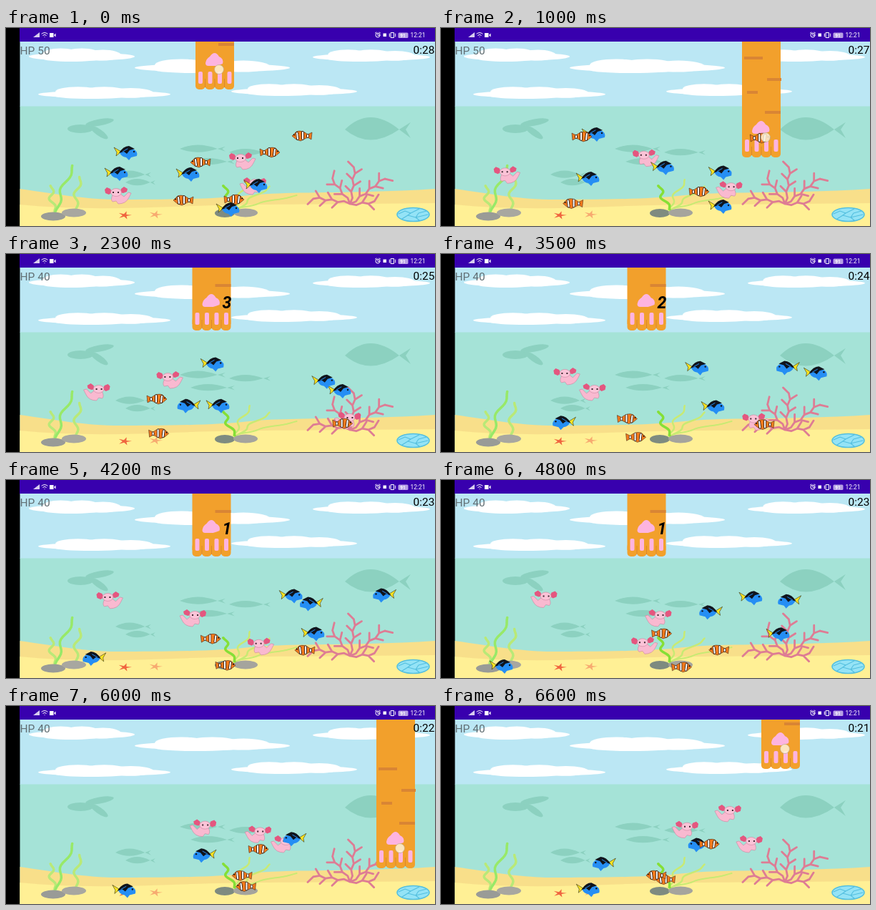
These frames come from a looping animation (600x277 px, 6.7 s). An HTML page:

```html
<!DOCTYPE html>
<html lang="en">
<head>
<meta charset="utf-8">
<title>Fishing paw</title>
<style>
html, body { margin: 0; width: 100%; height: 100%; overflow: hidden; background: #000; }
svg { display: block; width: 100vw; height: 100vh; }
text { font-family: Roboto, Arial, sans-serif; }
.line { fill: none; stroke-linecap: round; stroke-linejoin: round; }
</style>
</head>
<body>
<svg viewBox="0 0 600 277" preserveAspectRatio="none">
  <defs>
    <clipPath id="water"><rect x="19.500" y="19" width="581" height="258"/></clipPath>

    <!-- All three sprites face right -->
    <g id="tang">
      <path fill="#ffe51f" stroke="#2a2a18" stroke-width=".600" d="M-17-7L-7-1L-14 5L-13 0Z"/>
      <path fill="#258ef4" d="M-9 0Q0-9 9-5Q17-2 15 5L7 7L4 11L0 7Q-7 6-9 0Z"/>
      <path fill="#10141c" d="M-10 1Q-4-9 4-9L12-5L5-3L1 2L-3-1Z"/>
      <path class="line" stroke="#258ef4" d="M-5-1L2-5"/>
      <circle cx="11" cy="-1" r="1.200" fill="#10141c"/>
    </g>
    <g id="clown">
      <path fill="#f47a1c" stroke="#4a2a18" stroke-width=".600" d="M-14-5L-8-2Q0-9 8-6L14 0L8 5L2 7L-8 2L-13 5Z"/>
      <path id="bands" class="line" stroke="#33241c" stroke-width="3.400" d="M7-4L6 4M-1-5V4M-8-1V1"/>
      <use href="#bands" style="stroke:#fff"/>
      <path class="line" stroke="#fff" stroke-width="2" d="M7-4L6 4M-1-5V4M-8-1V1"/>
      <circle cx="11" cy="-1.500" r="1.100" fill="#22150f"/>
    </g>
    <g id="axolotl" stroke="#cc839e" stroke-width=".600">
      <path fill="#f9b9d0" d="M8-1Q11 5 8 8L3 7L0 11Q-11 11-15 2L-18-4L-14-5L-8 1L-3-3Z"/>
      <path fill="#e4567f" stroke="none" d="M-3-5L-7-4L-12-6L-13-10L-8-13L-4-10ZM9-5L11-10L16-12L19-9L18-4L13-2Z"/>
      <ellipse cx="3" cy="-5" rx="7.500" ry="5.500" fill="#fbc3d7"/>
      <path fill="#3d2530" stroke="none" d="M-1-6h2v2h-2zM6-6h2v2h-2z"/>
    </g>

    <!-- Origin at the bottom centre -->
    <g id="paw">
      <path fill="#f2a02c" d="M-27-300H27V-8H-27Z"/>
      <path fill="#d98534" d="M-24-140h26v4h-26zM8-110h20v4h-20zM-20-92h15v4h-15zM5-64h22v4h-22z"/>
      <path fill="#fdb4e0" d="M-13-36Q-12-42-7-45Q0-55 6-45Q13-42 11-35Q6-33 2-32H-9Q-13-32-13-36Z"/>
      <g id="toes"></g>
    </g>
  </defs>

  <rect width="600" height="277"/>
  <rect x="19" width="581" height="19.500" fill="#3800ae"/>

  <g fill="#fff">
    <path d="M38 13L47 6V13Z" opacity=".8"/>
    <path d="M61 7h5.500v6h-5.500zM67 10L69.500 7.500V12.500Z"/>
    <g class="line" stroke="#fff">
      <path d="M50 8Q54 5 58 8M51.700 10.300Q54 8 56.300 10.300M54 12.500V12.600"/>
      <circle cx="520" cy="10" r="3"/>
      <path d="M520 8.300V10.300H521.500M516.500 7L518 6M523.500 7L522 6M538.500 6.500h4v7h-4zM536.300 8v4M544.700 8v4"/>
    </g>
    <rect x="527.500" y="7.500" width="4.500" height="4.500"/>
    <rect x="548.500" y="6.500" width="14" height="7.500" rx="1.500" fill="#b7a0e5"/>
    <text x="555" y="12.700" font-size="6.500" font-weight="700" text-anchor="middle">91</text>
    <text x="565.500" y="13" font-size="8.400">12:21</text>
  </g>

  <g clip-path="url(#water)">
    <rect x="19" y="19" width="581" height="91" fill="#bbe7f4"/>
    <rect x="19" y="109.500" width="581" height="168" fill="#a5e3d7"/>
    <g id="clouds" fill="#fff"></g>
    <g id="shadows" fill="#8cd1c0"></g>
    <path fill="#f8df8a" d="M19 225C70 232 110 240 160 240S290 240 340 234S500 232 600 225V277H19Z"/>
    <path fill="#fff095" d="M19 247C100 255 180 252 260 249S450 247 600 245V277H19Z"/>
    <g id="weeds" class="line"></g>
    <g id="rocks"></g>
    <path id="coral" class="line" stroke="#de7c94" stroke-width="2.800"/>
    <ellipse cx="569.500" cy="261" rx="22.500" ry="9.500" fill="#94e3f6" stroke="#54bfdf" stroke-width="1.600"/>
    <path class="line" stroke="#54bfdf" stroke-width="1.200" d="M549 260L558 256L566 259L578 253M554 267L562 262L573 265L590 261M566 259L562 262M573 265L577 259L588 256M573 265L578 269"/>

    <use id="arm" href="#paw"/>
    <g id="shoal"></g>
    <circle id="finger" r="6.500" fill="#fff6df" fill-opacity=".82" stroke="#b9a88a" stroke-opacity=".7"/>
    <text id="stun" x="309" y="75.500" font-size="23" font-weight="700" font-style="italic" text-anchor="middle"></text>
  </g>

  <text id="hp" x="19.500" y="36.800" font-size="15.500" fill="#606d72"></text>
  <text id="clock" x="599.500" y="36.300" font-size="15.500" text-anchor="end"></text>
</svg>

<script>
const LOOP = 6700, STEP = 100;
const HIT = 1900, FREE = 4900;
const HOME = { x: 287.5, y: 106 };
const $ = id => document.getElementById(id);

function add(parent, tag, attrs) {
  const node = document.createElementNS("http://www.w3.org/2000/svg", tag);
  for (const key in attrs) node.setAttribute(key, attrs[key]);
  $(parent).append(node);
  return node;
}

function ellipse(parent, cx, cy, rx, ry, attrs) {
  return add(parent, "ellipse", { cx, cy, rx, ry, ...attrs });
}

// A flat lens with three bumps on top
function cloud(x, y, w, h) {
  ellipse("clouds", x + w / 2, y + h * .65, w / 2, h * .28);
  for (const k of [.3, .5, .7])
    ellipse("clouds", x + w * k, y + h * (.4 + Math.abs(k - .4) / 2), w * .17, h * .38);
  ellipse("clouds", x + w * .4, y + h * .8, w * .27, h * .2);
}

function shadowFish(x, y, w, h) {
  const a = w / 2, b = h / 2;
  add("shadows", "path", {
    d: `M${-a} 0Q${-a / 4} ${-b * 2} ${a * .65} 0L${a} ${-b * .6}L${a * .85} 0L${a} ${b * .7}L${a * .65} 0Q${-a / 4} ${b * 1.7} ${-a} 0Z`,
    transform: `translate(${x} ${y})`
  });
}

// A stalk that sways from its root to its tip
function weed(x, y, tipX, tipY, stroke, width = 3.5) {
  let d = `M${x} ${y}`;
  for (let k = .05; k <= 1; k += .05) {
    const sway = 5 * Math.sin(k * 10) * Math.sin(k * Math.PI);
    d += `L${x + (tipX - x) * k + sway} ${y + (tipY - y) * k}`;
  }
  add("weeds", "path", { d, stroke, "stroke-width": width });
}

function rock(x, y, rx, fill) {
  ellipse("rocks", x, y, rx, 6, { fill });
}

function star(x, y, fill) {
  let d = "";
  for (let i = 0; i < 10; i++) {
    const r = i % 2 ? 3 : 10, a = i * Math.PI / 5 - 1.3;
    d += `${i ? "L" : "M"}${x + r * Math.cos(a)} ${y + r * .6 * Math.sin(a)}`;
  }
  add("rocks", "path", { d: d + "Z", fill });
}

// A bending arm with twigs on alternate sides; angles are from upright
function coralArm(angle, length) {
  let x = 481, y = 246, a = angle * Math.PI / 180, d = `M${x} ${y}`, twigs = "";
  for (let i = 1; i * 9 <= length; i++) {
    const side = i % 2 ? 1 : -1, bend = a + side * .3, twig = a + side * .9;
    x += 9 * Math.sin(bend);
    y -= 9 * Math.cos(bend);
    d += `L${x} ${y}`;
    if (i > 1) twigs += `M${x} ${y}l${11 * Math.sin(twig)} ${-11 * Math.cos(twig)}`;
  }
  return d + twigs;
}

cloud(32, 27, 148, 20);
cloud(180, 42, 217, 21);
cloud(45, 81, 185, 18);
cloud(315, 77, 176, 18);
cloud(429, 29, 164, 18);

shadowFish(275, 169, 64, 11);
shadowFish(341, 174, 58, 10);
shadowFish(289, 187, 62, 10);
shadowFish(178, 205, 50, 11);
shadowFish(188, 216, 42, 10);
shadowFish(520, 142, 92, 34);
ellipse("shadows", 104, 141, 18, 6);
ellipse("shadows", 131, 132, 20, 4.5, { transform: "rotate(-10 131 132)" });
ellipse("shadows", 130, 146, 15, 4.5, { transform: "rotate(35 130 146)" });

weed(68, 257, 62, 219, "#b9e977");
weed(97, 256, 103, 206, "#b9e977");
weed(69, 257, 94, 189, "#98e968");
weed(325, 252, 411, 233, "#c8ea73", 2);
weed(322, 254, 371, 220, "#c8ea73", 2.5);
weed(318, 254, 342, 210, "#c8ea73", 2.5);
weed(320, 254, 303, 219, "#85df36");

rock(66, 263.5, 17, "#999b97");
rock(95, 258.5, 17, "#a8a7a0");
rock(306, 259, 14, "#7e8b80");
rock(335, 258.5, 17, "#a5a49d");
star(166, 262, "#f0653f");
star(209, 261, "#f7aa70");

$("coral").setAttribute("d",
  coralArm(6, 56) + coralArm(-38, 46) + coralArm(52, 66) + coralArm(-82, 54) + coralArm(84, 38));

for (let i = 0; i < 4; i++) {
  const x = -27 + i * 13.5;
  add("toes", "rect", { x, y: -18, width: 13.5, height: 19, rx: 5, fill: "#f2a02c" });
  add("toes", "rect", { x: x + 4, y: -24, width: 6, height: 17, rx: 2, fill: "#fdb4e0" });
  if (i) add("toes", "path", { d: `M${x} -14V-2`, stroke: "#dd862a" });
}

// Each fish swims straight from turn to turn, given as [time, x, y];
// it is caught when its route runs out.
const shoal = [];
function fish(kind, ...route) {
  shoal.push({ node: add("shoal", "use", { href: "#" + kind }), route });
}

fish("axolotl", [0, 157, 235], [1430, 65, 194], [LOOP, 438, 194]);
fish("axolotl", [0, 331, 187], [4640, 126, 167], [LOOP, 352, 174]);
fish("axolotl", [0, 345, 222], [2900, 512, 237], [4950, 267, 232], [LOOP, 409, 146]);

fish("tang", [0, 168, 174], [1000, 214, 148], [5700, 486, 168]);
fish("tang", [0, 155, 203], [1000, 206, 210], [6000, 556, 217]);
fish("tang", [0, 255, 204], [1280, 326, 192], [4770, 83, 260], [LOOP, 213, 256]);
fish("tang", [0, 311, 253], [1000, 391, 249], [2300, 467, 191], [3950, 546, 157], [LOOP, 354, 195]);
fish("tang", [0, 350, 220], [3420, 491, 157], [LOOP, 219, 222]);

fish("clown", [0, 272, 188], [1000, 197, 152], [2300, 211, 203], [3300, 253, 233], [LOOP, 379, 192]);
fish("clown", [0, 248, 241], [1310, 165, 247], [5300, 361, 264], [LOOP, 310, 241]);
fish("clown", [0, 319, 240], [1000, 361, 229], [2600, 496, 239], [LOOP, 296, 237]);
fish("clown", [0, 369, 174], [1100, 454, 152]);
fish("clown", [0, 414, 151], [600, 385, 150]);

const firstDrag = [[0, 292, 85], [1000, 448, 180], [HIT, 450, 228]];
const nextDrag = [[FREE, HOME.x, HOME.y], [5400, 417, 131], [6000, 545, 226], [6600, 475, 87]];

function sample(route, t) {
  let i = 0;
  while (i < route.length - 2 && t >= route[i + 1][0]) i++;
  const [t0, x0, y0] = route[i], [t1, x1, y1] = route[i + 1];
  const k = Math.min(1, (t - t0) / (t1 - t0));
  return { x: x0 + (x1 - x0) * k, y: y0 + (y1 - y0) * k, flip: x1 < x0 ? -1 : 1 };
}

function place(node, x, y, flip = 1) {
  node.setAttribute("transform", `translate(${x} ${y}) scale(${flip} 1)`);
}

function show(node, on) {
  node.style.display = on ? "" : "none";
}

function draw(t) {
  for (const { node, route } of shoal) {
    const { x, y, flip } = sample(route, t);
    place(node, x, y, flip);
    show(node, t < route[route.length - 1][0]);
  }
  const stunned = t >= HIT && t < FREE;
  const arm = stunned ? HOME : sample(t < HIT ? firstDrag : nextDrag, t);
  place($("arm"), arm.x, arm.y);
  place($("finger"), arm.x + 6, arm.y - 27);
  show($("finger"), !stunned);
  $("stun").textContent = stunned ? 3 - Math.floor((t - HIT) / 1000) : "";
  $("hp").textContent = t < HIT ? "HP 50" : "HP 40";
  $("clock").textContent = "0:" + (28 - Math.floor((t + 900) / 1000));
}

const start = performance.now();
function tick() {
  const t = (performance.now() - start) % LOOP;
  draw(Math.floor(t / STEP) * STEP);
  requestAnimationFrame(tick);
}
tick();
</script>
</body>
</html>
```
